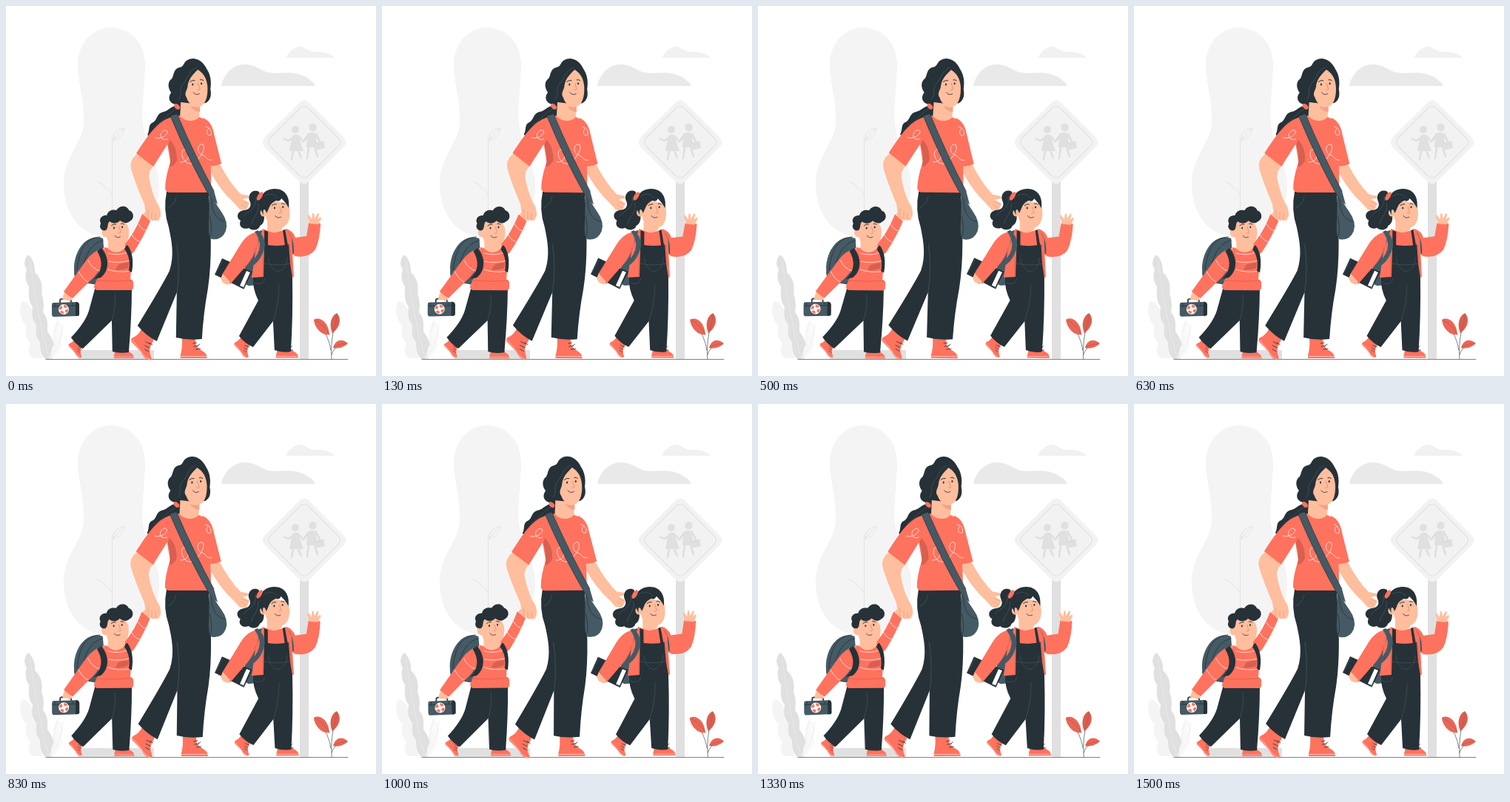
Write an HTML page with a canvas that moves like this. It is 500 px wide and 500 px high and loops after 1.54 s.

```html
<!DOCTYPE html>
<html lang="en">
<head>
<meta charset="utf-8">
<title>Walking to school</title>
<style>
  html, body { margin: 0; width: 100%; height: 100%; overflow: hidden; background: #fff; }
  canvas { display: block; width: 500px; height: 500px; }
</style>
</head>
<body>
<canvas id="stage"></canvas>
<script>
const LOOP = 1540;
const LEAD = 30;
const RED = '#ff725e', RED_SHADE = '#d95f50', LEAF = '#e86757', DARK = '#263238', SLATE = '#455a64', SKIN = '#ffbe9d';
const PALE = '#f4f4f4', MIST = '#ebebeb', GREY = '#e0e0e0', WHITE = '#fff';

const canvas = document.getElementById('stage');
const ctx = canvas.getContext('2d');
const ratio = window.devicePixelRatio || 1;
canvas.width = canvas.height = 500 * ratio;

function fill(color, d) {
  ctx.fillStyle = color;
  ctx.fill(new Path2D(d));
}

function line(color, width, d) {
  ctx.strokeStyle = color;
  ctx.lineWidth = width;
  ctx.lineCap = ctx.lineJoin = 'round';
  ctx.stroke(new Path2D(d));
}

function oval(color, x, y, rx, ry = rx, angle = 0) {
  ctx.fillStyle = color;
  ctx.beginPath();
  ctx.ellipse(x, y, rx, ry, angle, 0, Math.PI * 2);
  ctx.fill();
}

function around(x, y, angle, draw) {
  ctx.save();
  ctx.translate(x, y);
  ctx.rotate(angle);
  ctx.translate(-x, -y);
  draw();
  ctx.restore();
}

function placed(x, y, size, draw) {
  ctx.save();
  ctx.translate(x, y);
  ctx.scale(size, size);
  draw();
  ctx.restore();
}

function diamond(half, radius) {
  ctx.beginPath();
  ctx.roundRect(403 - half, 184 - half, half * 2, half * 2, radius);
}

function drawBackdrop() {
  fill(PALE, 'M142 29C117 29 98 50 97 78C97 105 107 130 105 160C103 185 78 205 78 240C78 282 101 313 143 313C182 313 207 283 207 243C207 210 187 187 185 158C183 130 188 105 188 80C188 50 168 29 142 29Z');
  line(GREY, 0.8, 'M143.500 178V465M143 255Q136 243 123 237M144 184L150 176M145 181C144 172 151 167 160 165C159 174 154 181 145 181L159 166');
  fill(GREY, 'M97 465H200V477H97Z');

  fill(PALE, 'M22 398C30 401 37 410 39 422C48 435 50 455 49 476H36C29 471 30 464 33 457C25 447 26 440 28 433C18 422 17 409 22 398Z');
  fill(GREY, 'M30 336C36 341 40 351 39 360C48 368 50 379 48 389C52 399 51 409 50 414C58 422 56 433 56 440C66 453 68 465 62 477H53C46 470 46 460 46 454C39 446 41 437 41 431C34 423 35 414 36 407C29 397 31 386 31 379C25 371 26 362 28 356C23 349 25 341 30 336Z');
  line(MIST, 0.7, 'M33 346Q42 420 58 476');
  fill('#f9f9f9', 'M70 424C79 434 78 445 75 449C78 462 69 473 59 477C61 468 62 462 65 457C61 446 65 433 70 424Z');
  line(MIST, 0.7, 'M70 426Q63 445 66 460L60 476M77 429Q76 452 62 474');

  fill('#e9e9e9', 'M291 108C293 96 304 79 322 79C338 79 343 87 355 90C367 92 385 88 398 93C409 97 416 103 418 108Z');
  fill('#f1f1f1', 'M378 70C381 65 387 55 397 55C405 55 408 61 416 62C428 61 439 64 444 70Z');
}

function drawSign() {
  fill(GREY, 'M397 236H409V477H397Z');
  around(403, 184, Math.PI / 4, () => {
    diamond(42.4, 9);
    ctx.fillStyle = '#f2f2f2';
    ctx.fill();
    diamond(36.5, 8);
    ctx.strokeStyle = GREY;
    ctx.lineWidth = 1;
    ctx.stroke();
  });
  oval(GREY, 391, 167, 5);
  oval(GREY, 414.5, 164, 5.2);
  fill(GREY, 'M387 175Q392 172 396 175L398 184L402 196H383Z');
  fill(GREY, 'M408 172Q414 169 419 172L420 191H407Z');
  line(GREY, 2.8, 'M388 178L382 182L376 180M396 177L402 183L408 174M419 173L424 183M388 196L386 207M395 196L399 205M409 190L407 206M417 190L421 203');
  fill(GREY, 'M416 185L429 183L431 192L418 195Z');
  line('#d6d6d6', 0.7, 'M417 186L429 184M407 177L407 191');
}

function drawPlant() {
  line(DARK, 0.6, 'M440 477Q438 450 446 425M439 465Q437 448 422 426M440 471Q443 461 454 457');
  fill(LEAF, 'M416 424C424 419 436 427 437 444C427 446 417 435 416 424Z');
  fill(RED_SHADE, 'M447 415C453 421 453 433 441 442C436 431 439 419 447 415Z');
  fill(LEAF, 'M442 462C445 450 455 449 462 456C458 460 450 464 442 462Z');
  line('#b94f43', 0.6, 'M418 425Q431 432 437 444M447 417Q446 432 441 442M443 461Q451 456 460 456');
}

// Boot standing flat; size 1 spans about 36 px.
function flatShoe(x, y, size) {
  placed(x, y, size, () => {
    fill(RED, 'M2 -27H20L21 -18Q24 -13 31 -9Q36 -6 36 0H0V-4Q3 -14 2 -27Z');
    line('#ffd5ce', 0.8, 'M0 -2.500H35');
    line(DARK, 0.8, 'M17 -20L22 -21M18 -16L24 -17M21 -12L27 -13M23 -17L26 -19');
  });
}

// Boot pushing off from the toe.
function raisedShoe(x, y, size) {
  placed(x, y, size, () => {
    fill(RED, 'M13 -41L30 -27L26 -19Q23 -13 26 -5Q28 0 23 0Q17 -1 12 -11Q6 -18 0 -24Q-2 -28 2 -30Q9 -33 13 -41Z');
    line('#ffd5ce', 0.8, 'M1 -26Q8 -18 12 -12Q18 -2 24 -1');
    line(DARK, 0.8, 'M19 -24L25 -21M18 -19L24 -16M18 -14L23 -11M24 -23L28 -20');
  });
}

function drawFace(x, y, size) {
  placed(x, y, size, () => {
    oval(DARK, -6, 0, 1.2, 1.7);
    oval(DARK, 7, -1.5, 1.2, 1.7);
    line(DARK, 1.1, 'M-10 -4Q-7 -7 -3 -6M5 -7Q8 -8 10 -6');
    line('#c97b63', 0.7, 'M2 -2Q4 4 5 7Q4 9 1 8');
    line(DARK, 0.9, 'M-5 12Q-2 17 4 14');
  });
}

function drawMother() {
  fill(SKIN, 'M274 214L288 212Q302 239 317 254L327 256L329 259L320 261L329 266L327 271L324 276L316 275L309 267Q289 249 275 222Z');
  line('#e89b7d', 0.6, 'M320 264L327 267M318 268L325 272');
  fill(RED, 'M266 151Q278 156 281 173L291 213Q283 217 275 216L268 176Z');

  fill(DARK, 'M237 134C222 134 221 141 213 143C203 145 205 153 199 157C191 160 195 167 191 174L197 181L236 164Z');
  line(SLATE, 0.6, 'M229 140C216 147 213 155 203 161');
  fill(DARK, 'M271 85C265 72 253 68 245 73C239 76 241 82 234 83C226 85 227 93 224 98C217 103 219 112 223 117C217 125 222 132 229 133C236 138 246 140 254 133L270 131C278 126 277 118 276 112C278 100 275 91 271 85Z');

  raisedShoe(170, 478, 1);
  flatShoe(236, 476, 1);
  fill(DARK, 'M217 251H274C277 300 279 342 273 382Q267 415 265 450Q246 452 230 448L231 387L204 453Q190 446 178 432Q211 378 221 358C228 337 224 318 220 299Q212 276 217 251Z');
  line(SLATE, 0.7, 'M231 388Q236 358 231 322M219 273Q227 270 230 258');

  fill(RED, 'M235 148C223 149 214 153 206 160C195 169 184 187 176 199Q186 211 199 217L218 187L222 211Q215 232 215 247Q216 252 222 252H272Q277 252 277 247V227C275 209 280 191 279 176Q278 156 261 150Z');
  fill(RED_SHADE, 'M221 181Q231 189 231 209Q224 220 221 216Q224 204 219 188Z');
  fill(SKIN, 'M236 130L235 149C243 157 255 157 261 150L262 133Z');
  fill('#f0a486', 'M249 135Q256 138 262 136L262 143Q254 143 249 135Z');
  fill(SKIN, 'M259 86C267 91 271 98 272 108C273 121 270 134 261 136C252 137 246 131 244 124C240 119 244 114 245 110C246 99 251 94 259 86Z');
  line(SLATE, 0.7, 'M257 83C245 88 247 97 239 105C233 112 239 119 233 126');
  drawFace(257.5, 106, 0.9);
  oval(RED, 231, 136, 3, 4.5, -0.8);

  line(WHITE, 0.7, 'M201 178C208 181 218 175 218 170C216 165 207 170 209 177Q211 182 218 180M236 211C248 211 249 200 244 195C237 191 235 202 242 210Q248 216 256 211C260 206 271 195 266 187C259 185 256 198 265 201C272 203 270 209 278 208M270 163C274 163 279 169 277 174C272 177 269 169 274 165');

  fill(SKIN, 'M177 200L199 217Q193 222 193 231Q197 253 204 266Q210 274 209 284L206 290L197 290L189 282L187 268Q174 238 169 220Q166 209 177 200Z');
  line('#e89b7d', 0.7, 'M192 275Q191 282 192 286M197 279V288M202 281V288');

  fill(SLATE, 'M275 250Q281 264 291 278Q301 292 297 304Q292 317 278 315Q273 312 274 294Z');
  line(DARK, 0.8, 'M278 261C278 280 285 288 295 291M275 284Q280 303 276 311');
  fill(SLATE, 'M222 149L231 146Q254 200 281 250L286 268L278 262Q250 215 222 149Z');
  line(DARK, 0.7, 'M222 149Q250 215 278 262M231 146Q254 200 281 250');
}

function drawBoy() {
  fill(RED, 'M160 322Q174 307 184 281L195 290Q187 310 173 332L164 340Z');
  line(WHITE, 0.7, 'M179 295Q183 302 188 303M170 309Q174 316 180 318');
  fill(SKIN, 'M185 281L191 276L199 282L194 290Z');

  fill(SLATE, 'M131 314C109 306 91 331 92 357Q91 370 100 373L124 377L132 326Z');
  line(DARK, 0.8, 'M127 312C105 313 98 335 96 357M131 317C112 321 104 342 102 371');

  raisedShoe(85, 475.500, 0.65);
  flatShoe(146, 476, 0.75);
  fill(DARK, 'M121 379L170 381Q170 421 166 468Q154 470 144 467L143 425L104 463Q94 457 88 448Q107 428 112 412Z');
  line(SLATE, 0.6, 'M143 425Q149 406 147 390');

  fill(RED, 'M133 326Q149 331 165 323Q171 345 168 369Q173 371 172 375V380Q172 384 168 384H123Q119 383 119 379L123 369L128 349Z');
  line(RED_SHADE, 0.8, 'M121 371Q145 373 170 371');
  fill(RED_SHADE, 'M151 350Q160 346 166 347L165 354Q157 357 148 357Z');
  line(WHITE, 0.7, 'M138 334Q152 338 164 333M139 345Q151 348 167 344M138 356Q152 361 168 358');
  fill(DARK, 'M164 323Q174 336 170 360L166 358Q169 339 159 327Z');

  fill(RED, 'M132 327Q117 331 108 344L78 386Q83 392 90 395L112 373Q135 354 132 327Z');
  line(WHITE, 0.7, 'M111 344Q117 356 127 358M98 359Q105 371 111 373');
  fill(DARK, 'M129 327C140 340 140 358 128 367L119 369Q136 352 123 331Z');

  fill(SKIN, 'M138 318V328Q149 338 161 327V318Z');
  fill(SKIN, 'M135 291C148 284 166 289 166 304C167 317 161 325 151 325C142 325 137 319 136 312C130 314 127 304 132 301Z');
  fill(DARK, 'M135 303C129 305 125 299 128 294C124 286 132 282 136 283C138 275 146 275 149 276C154 268 164 270 166 276C173 278 174 288 167 291C161 296 156 291 154 290C148 296 142 293 140 291C136 294 139 299 135 303Z');
  drawFace(151, 300, 0.85);

  line(DARK, 1.7, 'M73 402V398Q73 396 76 396H85Q88 396 88 399V402');
  fill(SKIN, 'M79 387L90 396L86 399L81 397L76 398L77 392Z');
  fill(SLATE, 'M64 401L96 400Q99 401 99 404V417Q99 419 96 419L64 420Q62 419 62 417V404Q62 401 64 401Z');
  fill(DARK, 'M94 400Q99 400 99 404V417Q99 419 94 419Z');
  line(DARK, 0.8, 'M63 406L97 405M66 402V405M90 401V404');
  oval(WHITE, 78, 410, 7);
  ctx.strokeStyle = RED;
  ctx.lineWidth = 3.5;
  ctx.lineCap = 'butt';
  for (let i = 0; i < 4; i++) {
    ctx.beginPath();
    ctx.arc(78, 410, 4.5, i * Math.PI / 2, i * Math.PI / 2 + 1);
    ctx.stroke();
  }
}

function drawGirl() {
  fill(DARK, 'M342 251C332 246 326 256 329 263C333 271 328 276 321 276C311 278 311 287 317 290C313 298 321 303 328 300C334 305 342 302 343 297C350 294 350 283 347 276Z');
  line(SLATE, 0.7, 'M338 258C338 277 326 276 321 284M341 267C343 281 333 284 332 294');

  fill(RED, 'M379 301Q388 304 391 313L406 311L409 293Q418 291 425 294Q424 316 418 329Q409 341 391 338L379 330Z');
  fill(SKIN, 'M410 294L409 289Q406 282 409 282L413 288L414 280L416 280L417 287L421 280L423 281L421 288L425 285L426 287L422 295Z');
  fill(SLATE, 'M346 303Q331 306 327 325L322 360Q321 378 329 378L339 377L350 326Z');
  fill(SLATE, 'M378 302Q390 312 389 335L385 333Q386 315 374 305Z');

  raisedShoe(309, 475.500, 0.71);
  flatShoe(365, 475.500, 0.84);
  fill(RED, 'M347 301Q364 309 379 301L386 314L389 366Q361 371 332 367L337 332Z');
  fill(DARK, 'M349 322Q365 326 382 322L384 348L387 367Q388 420 385 467Q374 469 363 465L361 426L334 461Q323 456 315 446L341 398Q333 382 334 367L348 366Z');
  fill(DARK, 'M349 303L354 305L354 325L349 324ZM374 303L377 302L381 324H377Z');
  line(SLATE, 0.6, 'M354 340Q356 355 367 359Q380 356 380 340M336 374Q347 379 350 369M361 426Q369 403 369 377M349 348Q367 352 384 348');
  line(RED_SHADE, 0.8, 'M347 326V365M383 322L386 350');

  fill(DARK, 'M292 341L332 359L320 382L282 363Z');
  fill(WHITE, 'M325 358L330 360L321 380L316 378Z');
  line(DARK, 1.5, 'M332 359L321 382');
  line(SLATE, 0.7, 'M293 344L283 362');
  fill(RED, 'M342 305Q327 306 317 322L292 363Q296 371 303 376L322 354Q342 334 342 305Z');
  line(RED_SHADE, 0.8, 'M323 353Q335 340 337 327');
  fill(SLATE, 'M340 303Q350 311 350 324Q346 342 335 350L330 347Q343 336 343 322Q342 313 336 305Z');
  fill(SKIN, 'M293 362L303 373L300 377L293 374L290 368Z');

  fill(SKIN, 'M353 292V303Q362 310 373 302L374 292Z');
  fill(SKIN, 'M349 268Q366 260 382 269C386 285 382 299 370 300C360 300 352 294 351 284C344 287 341 278 346 274Z');
  fill(DARK, 'M344 275C338 262 347 247 363 247C377 247 384 258 382 273C379 267 375 263 372 260Q370 265 365 263C355 267 356 274 352 280C350 273 346 273 348 283Z');
  oval(RED, 343, 257, 3, 6.5, 0.55);
  line(SLATE, 0.6, 'M349 257Q358 250 367 259');
  drawFace(368, 273, 0.87);
}

function swayAt(time) {
  const phase = ((time + LEAD) % LOOP) / LOOP;
  const wave = phase < 0.25 ? phase * 4 : phase < 0.75 ? 2 - phase * 4 : phase * 4 - 4;
  return wave * Math.PI / 180;
}

function render(time) {
  const sway = swayAt(time);
  ctx.setTransform(ratio, 0, 0, ratio, 0, 0);
  ctx.fillStyle = WHITE;
  ctx.fillRect(0, 0, 500, 500);
  drawBackdrop();
  drawSign();
  line(DARK, 0.6, 'M54 477.500H462');
  around(439, 447, sway, drawPlant);
  around(128, 373, sway, drawBoy);
  around(247, 274, sway, drawMother);
  around(354, 362, sway, drawGirl);
}

const start = performance.now();
function tick() {
  render(performance.now() - start);
  requestAnimationFrame(tick);
}
tick();
</script>
</body>
</html>
```
